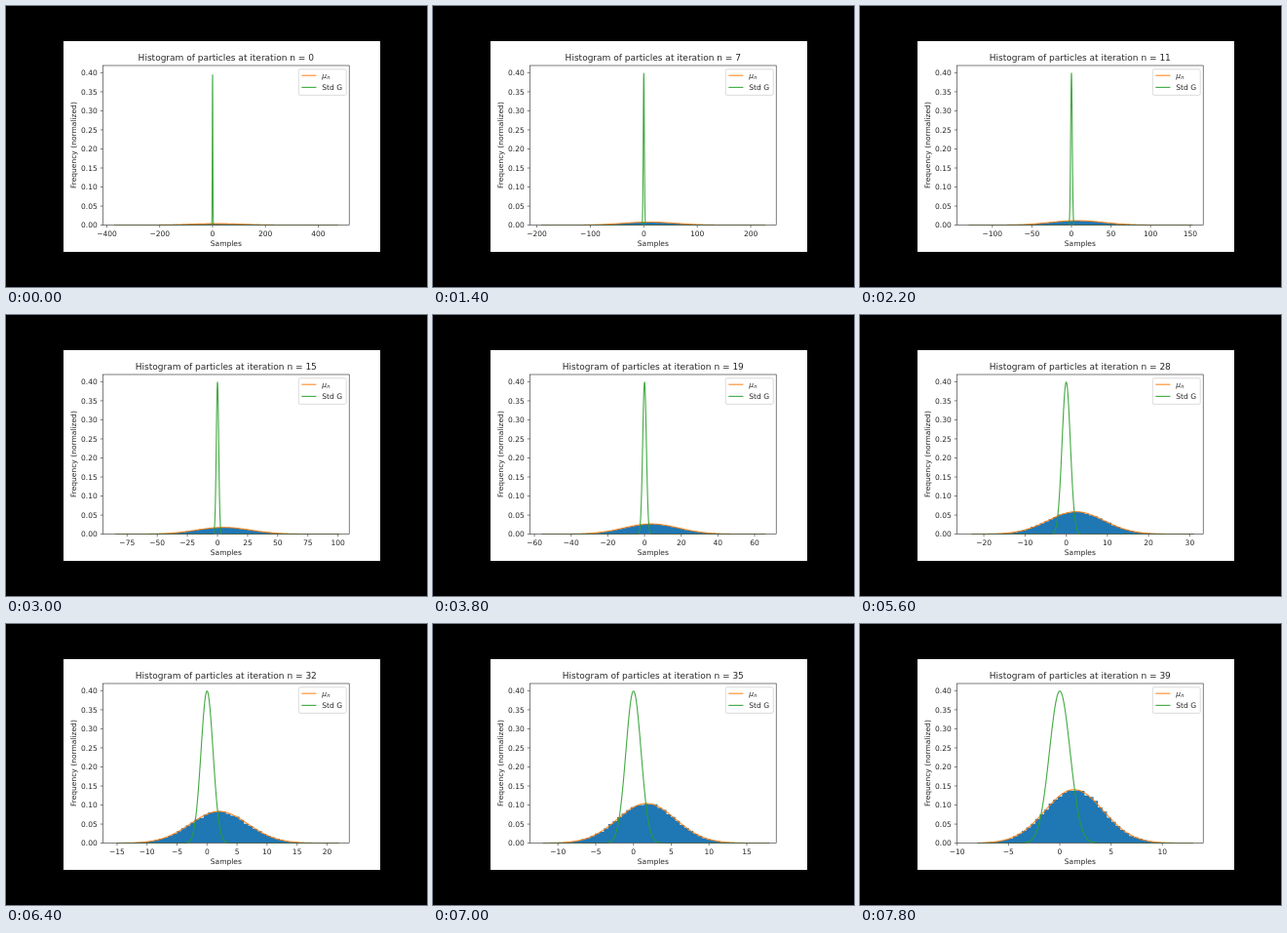
Recreate the animation shown at these times as an HTML page with a canvas. Size 432 px wide and 288 px high, loop 8000 ms.

```html
<!DOCTYPE html>
<html lang="en">
<head>
<meta charset="utf-8">
<title>Histogram of particles</title>
<style>
html, body { margin: 0; width: 100%; height: 100%; overflow: hidden; background: #000; }
canvas { display: block; width: 432px; height: 288px; }
</style>
</head>
<body>
<canvas id="stage"></canvas>
<script>
const W = 432, H = 288, STEP_MS = 200, COUNT = 40, BINS = 50;
const box = { l: 99.4, r: 352.2, t: 61, b: 224.6 };
const SCALE = (box.b - box.t) / 0.4189;
const BLUE = '#1f77b4', ORANGE = '#ff7f0e', GREEN = '#2ca02c', INK = '#262626';
const FONT = '"DejaVu Sans", sans-serif';

// Axis limits, spread and mean at a few iterations
const keys = {
  n:     [0, 7, 11, 19, 24, 32, 39],
  left:  [415, 213, 144.8, 62.5, 40.6, 17.36, 10.03],
  right: [517, 247.6, 166.5, 71.8, 46.7, 23.7, 13.98],
  sigma: [102, 50, 34, 14.9, 9.6, 4.8, 2.84],
  mean:  [15, 10, 7, 3.6, 2.8, 2, 1.4]
};

const canvas = document.getElementById('stage');
const ctx = canvas.getContext('2d');
const ratio = window.devicePixelRatio || 1;
canvas.width = W * ratio;
canvas.height = H * ratio;

// Geometric interpolation, as every quantity decays exponentially
function decay(name, n) {
  let i = 0;
  while (i < keys.n.length - 2 && n > keys.n[i + 1]) i++;
  const v = keys[name];
  const u = (n - keys.n[i]) / (keys.n[i + 1] - keys.n[i]);
  return v[i] * Math.pow(v[i + 1] / v[i], u);
}

function gauss(x, mean, sigma) {
  const z = (x - mean) / sigma;
  return Math.exp(-z * z / 2) / (sigma * Math.sqrt(2 * Math.PI));
}

function seeded(seed) {
  let s = seed * 7919 + 17;
  return () => (s = (s * 16807) % 2147483647) / 2147483647;
}

function tickStep(range) {
  const raw = range / 9;
  const base = Math.pow(10, Math.floor(Math.log10(raw)));
  return base * [1, 2, 2.5, 5, 10].find(k => k * base >= raw);
}

function text(str, x, y, size = 7.52, align = 'center', style = '') {
  ctx.font = `${style} ${size}px ${FONT}`;
  ctx.textAlign = align;
  ctx.fillStyle = INK;
  ctx.fillText(str, x, y);
}

function line(x1, y1, x2, y2, color = INK, width = 0.6) {
  ctx.strokeStyle = color;
  ctx.lineWidth = width;
  ctx.beginPath();
  ctx.moveTo(x1, y1);
  ctx.lineTo(x2, y2);
  ctx.stroke();
}

const toY = v => box.b - v * SCALE;

function curve(fn, from, to, toX, color) {
  const parts = 1600;
  ctx.beginPath();
  for (let i = 0; i <= parts; i++) {
    const x = from + (to - from) * i / parts;
    ctx.lineTo(toX(x), toY(fn(x)));
  }
  ctx.strokeStyle = color;
  ctx.lineWidth = 1.13;
  ctx.lineJoin = 'round';
  ctx.globalAlpha = 0.88;
  ctx.stroke();
  ctx.globalAlpha = 1;
}

function bars(n, lo, hi, pdf, peak, toX) {
  const rand = seeded(n + 1);
  const w = (hi - lo) / BINS;
  ctx.fillStyle = BLUE;
  ctx.beginPath();
  for (let i = 0; i < BINS; i++) {
    const x = lo + i * w;
    const p = pdf(x + w / 2);
    const noise = (rand() + rand() + rand() - 1.5) * 0.03 * Math.sqrt(p * peak);
    const y = toY(Math.max(0, p + noise));
    ctx.rect(toX(x), y, toX(x + w) - toX(x), box.b - y);
  }
  ctx.fill();
}

function axes(left, right, toX) {
  const step = tickStep(right - left);
  for (let k = Math.ceil(left / step); k * step <= right; k++) {
    const v = k * step, x = toX(v);
    line(x, box.b, x, box.b + 2.6);
    text(v < 0 ? '\u2212' + -v : String(v), x, 235.9);
  }
  for (let i = 0; i <= 8; i++) {
    const y = toY(i * 0.05);
    line(box.l - 2.6, y, box.l, y);
    text((i * 0.05).toFixed(2), box.l - 5.6, y + 2.8, 7.52, 'right');
  }
  ctx.strokeStyle = INK;
  ctx.lineWidth = 0.6;
  ctx.strokeRect(box.l, box.t, box.r - box.l, box.b - box.t);
  text('Samples', 225.8, 246.4);
  ctx.save();
  ctx.translate(71.8, 142.6);
  ctx.rotate(-Math.PI / 2);
  text('Frequency (normalized)', 0, 0);
  ctx.restore();
}

function legend() {
  ctx.beginPath();
  ctx.roundRect(300.3, 64.8, 48.9, 26.6, 1.5);
  ctx.fillStyle = 'rgba(255,255,255,0.8)';
  ctx.fill();
  ctx.strokeStyle = '#cfcfcf';
  ctx.lineWidth = 0.75;
  ctx.stroke();
  ctx.globalAlpha = 0.88;
  line(303.3, 71.2, 318.4, 71.2, ORANGE, 1.13);
  line(303.3, 83.4, 318.4, 83.4, GREEN, 1.13);
  ctx.globalAlpha = 1;
  text('μ', 324.3, 73.9, 7.52, 'left', 'italic');
  text('n', 329.2, 75.1, 5.27, 'left', 'italic');
  text('Std G', 324.3, 86.1, 7.52, 'left');
}

function draw(n) {
  const left = -decay('left', n), right = decay('right', n);
  const sigma = decay('sigma', n), mean = decay('mean', n);
  const margin = (right - left) / 22;
  const lo = left + margin, hi = right - margin;
  const from = Math.ceil(lo), to = Math.ceil(hi);
  const toX = v => box.l + (v - left) / (right - left) * (box.r - box.l);
  const pdf = x => gauss(x, mean, sigma);

  ctx.setTransform(ratio, 0, 0, ratio, 0, 0);
  ctx.fillStyle = '#000';
  ctx.fillRect(0, 0, W, H);
  ctx.fillStyle = '#fff';
  ctx.fillRect(59, 36, 325, 216);

  ctx.save();
  ctx.beginPath();
  ctx.rect(box.l, box.t, box.r - box.l, box.b - box.t);
  ctx.clip();
  bars(n, lo, hi, pdf, pdf(mean), toX);
  curve(pdf, from, to, toX, ORANGE);
  curve(x => gauss(x, 0, 1), from, to, toX, GREEN);
  ctx.restore();

  axes(left, right, toX);
  legend();
  text('Histogram of particles at iteration n = ' + n, 225.8, 55.8, 9.03);
}

const start = performance.now();
let shown = -1;
function tick() {
  const n = Math.floor((performance.now() - start) / STEP_MS) % COUNT;
  if (n !== shown) draw(shown = n);
  requestAnimationFrame(tick);
}
tick();
</script>
</body>
</html>
```
